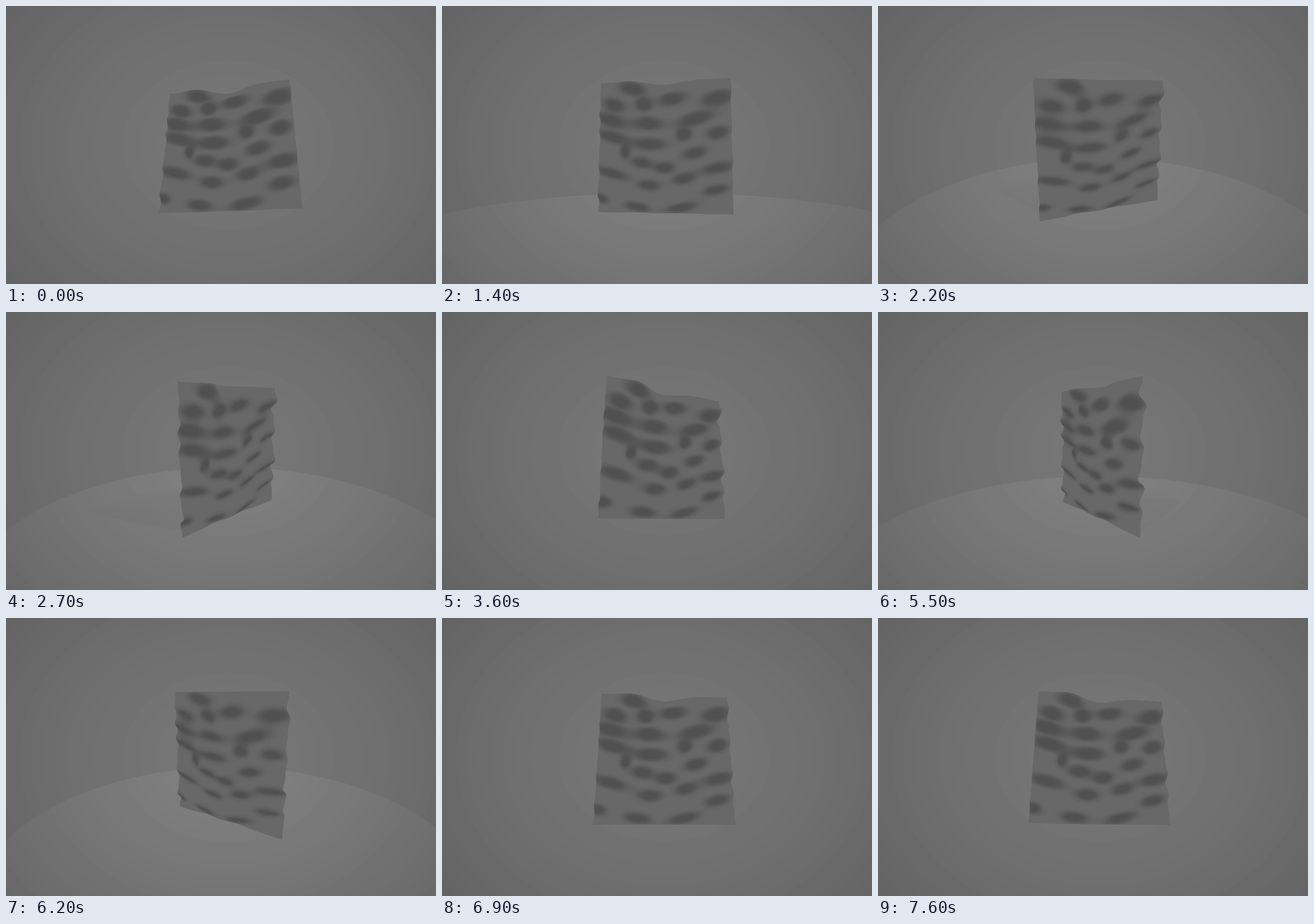
Write a matplotlib script that moves like this. It is 660 px wide and 428 px high and loops after 9900 ms.

```python
import matplotlib.pyplot as plt
import numpy as np
from matplotlib.animation import FuncAnimation

W, H, DPI = 660, 428, 100
FRAMES, INTERVAL = 99, 100
START, PACE, LAST = 14, 1.737, 36   # first move, frames per move, last move
CX, CY = 342, 216                   # screen position of the pivot
DIST, HALF, LIFT = 420, 99, 12      # camera distance, half side, plate offset
FLOOR_Y, FLOOR_R = -100, 315
N = 96

# Key points of the swing: move, yaw and pitch in degrees
REST = (12, -22)
SWING = np.array([
    (0, 7, -5), (4, -15, 10), (8, -46, 10), (13, -27, -14), (16, 10, -23),
    (19, 59, -17), (23, 56, 2), (28, 36, 13), (33, -10, -19), (36, -10, -17)])

# Ledges of the relief: u, v, length
LEDGES = [
    (.25, .05, .09), (.11, .18, .08), (.34, .18, .05), (.56, .14, .09),
    (.90, .15, .10), (.08, .30, .11), (.38, .33, .09), (.74, .30, .12),
    (.10, .43, .11), (.40, .49, .10), (.65, .42, .05), (.90, .41, .07),
    (.20, .55, .03), (.73, .56, .08), (.10, .71, .11), (.33, .63, .07),
    (.51, .67, .06), (.39, .80, .07), (.65, .75, .07), (.90, .67, .10),
    (.88, .83, .08), (.02, .90, .05), (.30, .96, .08), (.63, .96, .10)]


def smooth(x, lo, hi):
    t = np.clip((x - lo) / (hi - lo), 0, 1)
    return t * t * (3 - 2 * t)


def relief_and_tone(u, v):
    """Each ledge bulges above its line, falls back below it and is dark."""
    h = -20 * np.exp(-((u - .49) / .12) ** 2 / 2 - (v / .07) ** 2 / 2)
    shade = np.zeros_like(u)
    for u0, v0, length in LEDGES:
        tilt = .25 * np.cos(5 * (u0 - .1))
        thick = .042 - .012 * v0
        p = ((u - u0) + (v - v0) * tilt) / length
        q = ((v - v0) - (u - u0) * tilt) / thick
        spot = np.exp(-(p * p + q * q) / 2)
        h -= 2.4 * HALF * thick * q * spot * (1 + u ** 8)
        shade += spot
    return h, 104 - 24 * smooth(shade, .15, .95)


U, V = np.meshgrid(np.linspace(0, 1, N), np.linspace(0, 1, N))
RELIEF, TONE = relief_and_tone(U, V)

PX, PY = np.meshgrid(np.arange(W) + .5, np.arange(H) + .5)
RADIUS = np.hypot((PX - 341) / 330, (PY - 214) / 265)
WALL = 119 - 13 * RADIUS ** 1.5


def ease_through(x, xs, ys):
    """Smooth curve through the key points."""
    i = int(np.clip(np.searchsorted(xs, x, side="right") - 1, 0, len(xs) - 2))
    slope = np.gradient(ys, xs)
    step = xs[i + 1] - xs[i]
    t = (x - xs[i]) / step
    rise = ys[i + 1] - ys[i]
    return (ys[i] + rise * t * t * (3 - 2 * t)
            + step * t * (1 - t) * (slope[i] * (1 - t) - slope[i + 1] * t))


def view_at(n):
    move = min(np.ceil((n - START + 1) / PACE) - 1, LAST)
    if move < 0:
        return np.radians(REST)
    moves, *angles = SWING.T
    return np.radians([ease_through(move, moves, a) for a in angles])


def project(yaw, pitch):
    x, y, z = (2 * U - 1) * HALF, (1 - 2 * V) * HALF, RELIEF + LIFT
    x, z = (x * np.cos(yaw) - z * np.sin(yaw),
            x * np.sin(yaw) + z * np.cos(yaw))
    y, z = (y * np.cos(pitch) - z * np.sin(pitch),
            y * np.sin(pitch) + z * np.cos(pitch))
    scale = DIST / (DIST - z)
    return CX + x * scale, CY - y * scale


def backdrop(yaw, pitch):
    rise = DIST * np.sin(pitch) - FLOOR_Y
    if rise <= 0:
        return WALL
    sp, cp = np.sin(pitch), np.cos(pitch)
    dx, dy = (PX - 341) / DIST, (214 - PY) / DIST
    fall = sp - dy * cp
    t = rise / np.maximum(fall, 1e-6)
    x, z = dx * t, DIST * cp - (dy * sp + cp) * t
    edge = smooth(FLOOR_R - np.hypot(x, z), 0, 8) * (fall > 0)
    glow = 9.5 * np.clip(1.1 - .5 * RADIUS, 0, 1)
    # soft shadow behind the plate
    side = x * np.cos(yaw) + z * np.sin(yaw)
    back = x * np.sin(yaw) - z * np.cos(yaw)
    shade = (smooth(back, 0, 10) * smooth(-back, -200, -90)
             * smooth(HALF - np.abs(side + .4 * back), 0, 12))
    return WALL + smooth(rise, 0, 60) * edge * (glow - 3.5 * shade)


fig = plt.figure(figsize=(W / DPI, H / DPI), dpi=DPI)
ax = fig.add_axes([0, 0, 1, 1])
ax.axis("off")
gray = dict(cmap="gray", vmin=0, vmax=255)
wall = ax.imshow(WALL, extent=(0, W, H, 0), aspect="auto",
                 interpolation="nearest", **gray)
ax.set_xlim(0, W)
ax.set_ylim(H, 0)
plates = []


def update(n):
    yaw, pitch = view_at(n)
    wall.set_data(backdrop(yaw, pitch))
    while plates:
        plates.pop().remove()
    # far rows and columns first, so near ledges cover them
    order = (slice(None, None, 1 if pitch < 0 else -1),
             slice(None, None, 1 if yaw > 0 else -1))
    x, y = project(yaw, pitch)
    plates.append(ax.pcolormesh(x[order], y[order], TONE[order],
                                shading="gouraud", zorder=2, **gray))
    return [wall, *plates]


anim = FuncAnimation(fig, update, frames=FRAMES, interval=INTERVAL,
                     repeat=True, repeat_delay=0, blit=False)
plt.show()
```
